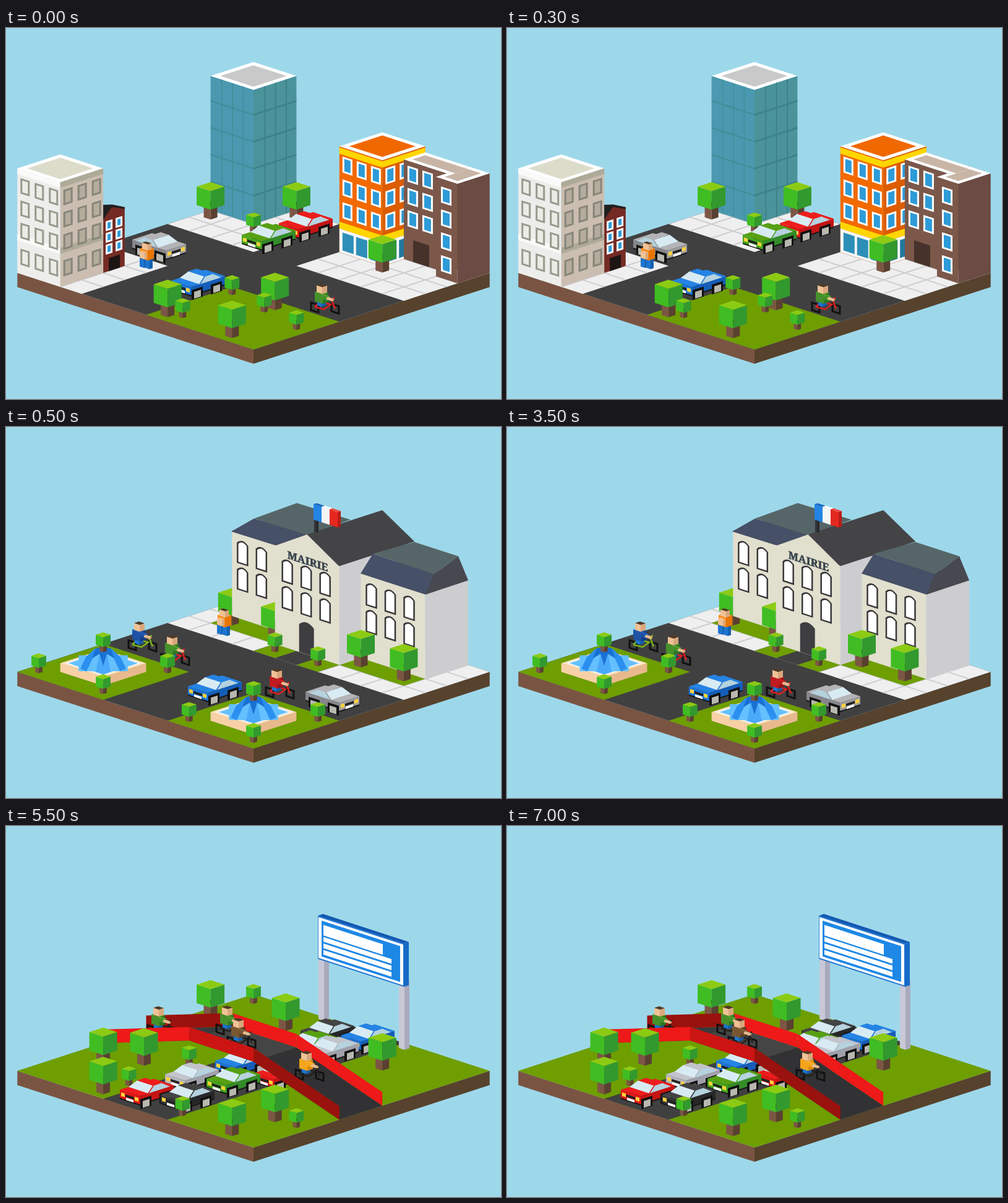
An HTML page for the animation above (8000 ms loop, 800x600 px).

```html
<!DOCTYPE html>
<html lang="fr">
<head>
<meta charset="utf-8">
<title>Isometric town</title>
<style>
html, body { margin: 0; width: 100%; height: 100%; overflow: hidden; background: #9dd8ea; }
svg { display: block; width: 800px; height: 600px; }
.scene { opacity: 0; animation: 8s step-end infinite; }
#street { animation-name: street; }
#hall { animation-name: hall; }
#bridge { animation-name: bridge; }
@keyframes street { 0% { opacity: 1 } 6.25%, 100% { opacity: 0 } }
@keyframes hall { 0% { opacity: 0 } 6.25% { opacity: 1 } 68.75%, 100% { opacity: 0 } }
@keyframes bridge { 0% { opacity: 0 } 68.75%, 100% { opacity: 1 } }
</style>
</head>
<body>
<svg viewBox="0 0 800 600">
  <g id="street" class="scene"></g>
  <g id="hall" class="scene"></g>
  <g id="bridge" class="scene"></g>
</svg>
<script>
// The town lies on 11 x 11 tiles: u runs to the lower right, v to the lower left.
const TILE = 34.7, K = 0.325, TILES = 11;
const ROAD = '#404041', GRASS = '#6e9e00', PAVE = '#efeff0', PANE = '#2d9bd8';
const TAN = ['#503a26', '#efc195', '#d9a77c'], JEANS = ['#2b86dd', '#1c75cf', '#155fae'];

const pos = (u, v, z = 0) => [400 + (u - v) * TILE, 272 + (u + v) * TILE * K - z];
const range = n => [...Array(n).keys()];
const poly = (fill, ...points) => `<polygon fill="${fill}" points="${points.join(' ')}"/>`;
const rect = (fill, x, y, w, h) => `<rect fill="${fill}" x="${x}" y="${y}" width="${w}" height="${h}"/>`;
const line = (color, width, ...points) =>
  `<polyline fill="none" stroke="${color}" stroke-width="${width}" points="${points.join(' ')}"/>`;
const at = (x, y, body, sx = 1, sy = sx) => `<g transform="translate(${x} ${y}) scale(${sx} ${sy})">${body}</g>`;
// Drawing plane of a wall: dir 1 descends to the right, -1 rises.
const wall = (x, y, dir, body) => `<g transform="matrix(1 ${dir * K} 0 1 ${x} ${y})">${body}</g>`;

// Cuboid with its front bottom corner at x, y; insets narrow the top.
function solid(x, y, w, d, h, [top, left, right], insetW = 0, insetD = insetW) {
  const pt = (u, v, z) => [x + v - u, y - (u + v) * K - z];
  const near = pt(insetW, insetD, h), west = pt(w - insetW, insetD, h), east = pt(insetW, d - insetD, h);
  return poly(left, pt(0, 0, 0), near, west, pt(w, 0, 0)) +
    poly(right, pt(0, 0, 0), near, east, pt(0, d, 0)) +
    poly(top, near, west, pt(w - insetW, d - insetD, h), east);
}

const flat = (fill, u, v, w, d, z = 0) =>
  poly(fill, pos(u, v, z), pos(u + w, v, z), pos(u + w, v + d, z), pos(u, v + d, z));

function paving(u, v, w, d) {
  const joint = (...ends) => line('#cdcdd1', 2, ...ends);
  return flat(PAVE, u, v, w, d) +
    range(w - 1).map(i => joint(pos(u + i + 1, v), pos(u + i + 1, v + d))).join('') +
    range(d - 1).map(i => joint(pos(u, v + i + 1), pos(u + w, v + i + 1))).join('');
}

const ground = top => solid(400, 543, TILES * TILE, TILES * TILE, 23, [top, '#7a5442', '#57422d']);

// Cuboid on the tile grid; `left` and `right` are drawn on its walls from their top left corner.
function building(u, v, w, d, h, paint, left = '', right = '') {
  const [x, y] = pos(u + w, v + d);
  return solid(x, y, w * TILE, d * TILE, h, paint) +
    wall(...pos(u, v + d, h), 1, left) + wall(x, y - h, -1, right);
}
const roofInset = (fill, u, v, w, d, z) => flat(fill, u + 0.23, v + 0.23, w - 0.46, d - 0.46, z);

// Evenly spaced windows.
const windows = (cols, rows, x, y, dx, dy, draw) =>
  range(rows).map(r => range(cols).map(c => draw(x + c * dx, y + r * dy)).join('')).join('');
const pane = (frame, glass, w, h) => (x, y) => rect(frame, x, y, w, h) + rect(glass, x + 3, y + 3, w - 6, h - 6);

const treeShape =
  solid(0, 0, 11, 11, 22, ['#000', '#7c5645', '#5a4030']) +
  solid(0, -16, 22.5, 22.5, 30, ['#8ccb14', '#40bd23', '#32992e']);
function plant(spots, size) {
  return spots.map(([u, v]) => {
    const [x, y] = pos(u, v);
    return at(x, y + 4 * size, treeShape, size);
  }).join('');
}
const trees = (...spots) => plant(spots, 1);
const shrubs = (...spots) => plant(spots, 0.53);

// Body paint: top, front, side.
const PAINT = {
  red: ['#ee1d1d', '#e01818', '#c51414'],
  blue: ['#2583e4', '#1c74d6', '#155db8'],
  green: ['#57a012', '#45a51c', '#348c28'],
  silver: ['#c3c3cb', '#b5b5be', '#a0a0aa'],
  gray: ['#b4b4b7', '#9b9b9f', '#87878b'],
  black: ['#434345', '#353537', '#272729']
};
const wheel = (x, y) => wall(x, y, -1, rect('#111', 0, 0, 18, 16) + rect('#b8b8b0', 4, 4, 11, 11));
function car(x, y, color, flip = false) {
  const paint = PAINT[color];
  const front = [2, 24].map(lamp => rect('#ffd23c', lamp, 3, 6, 6)).join('') +
    rect('#222', 9, 4, 14, 4) + rect('#fff', 10, 9, 12, 4);
  const body =
    solid(33, 44, 32, 55, 5, ['#111', '#161616', '#161616']) +
    solid(33, 42, 32, 55, 13, paint) + wall(1, 19, 1, front) +
    solid(47, 24.5, 32, 35, 8, [paint[0], '#d8ebf3', '#b5d2de'], 3, 11) +
    line(paint[1], 1.5, [47, 24.5], [55, 12]) +
    wheel(34, 34) + wheel(65, 25);
  return at(flip ? x + 88 : x, y, body, flip ? -1 : 1, 1);
}

const bikeWheel = (x, y) => wall(x, y, 1,
  `<rect fill="none" stroke="#111" stroke-width="3" x="0" y="0" width="12" height="12"/>`);
function rider(x, y, coat, frame) {
  return at(x, y,
    bikeWheel(3, 31) + bikeWheel(36, 33) +
    line(frame, 2.5, [9, 38], [17, 30], [35, 34], [24, 42], [9, 38]) + line(frame, 2.5, [42, 41], [36, 26], [41, 23]) +
    solid(20, 38, 7, 7, 12, JEANS) +
    solid(22, 33, 13, 9, 15, coat) + solid(30, 28, 11, 4, 6, coat) +
    solid(37, 29, 9, 3, 3, [TAN[1], TAN[1], TAN[2]]) +
    solid(21, 17, 9, 8, 11, TAN));
}
const GREEN = ['#57a52f', '#46912a', '#2e7623'], NAVY = ['#265fc0', '#1d52a5', '#173f84'];
const CRIMSON = ['#d02026', '#c11b20', '#94151a'], BROWN = ['#8a6439', '#795731', '#5c4126'];
const AMBER = ['#ffb52b', '#f5a51b', '#d98710'], ORANGE = ['#ff9a26', '#ff8a12', '#e87500'];

const walker = (x, y) => at(x, y,
  solid(11, 43, 7, 5, 16, JEANS) + solid(20, 45, 7, 5, 17, JEANS) +
  solid(17, 31, 12, 10, 16, ORANGE) + solid(12, 29, 8, 4, 10, [TAN[1], TAN[1], TAN[2]]) +
  solid(17, 15, 9, 6, 10, TAN));

function tower() {
  const side = 2 * TILE, height = 217;
  const lines = (color, width) =>
    range(3).map(i => rect(color, (i + 1) * side / 4, 0, width, height)).join('') +
    range(4).map(i => rect(color, 0, 39 + i * 43.5, side, width + 1)).join('');
  return building(0, 0, 2, 2, height, ['#fff', '#4b99b0', '#4b939b'], lines('#3f8f99', 1.5), lines('#3d828a', 2)) +
    roofInset('#c9c9c9', 0, 0, 2, 2, height);
}

function paleBlock() {
  const side = 2 * TILE;
  const front = (ledge, frame, glass) =>
    rect(ledge, 0, 0, side, 9) + rect(ledge, 0, 106, side, 10) +
    windows(3, 3, 5, 14, 23, 36, pane(frame, glass, 15, 25)) +
    windows(3, 1, 5, 128, 23, 0, pane(frame, glass, 15, 26));
  return building(0, 9, 2, 2, 169, ['#fff', '#ededeb', '#cbbeb0'],
    front('#fafaf8', '#99988c', '#ecece6'), front('#aeaa98', '#87857a', '#b4ac9c')) +
    roofInset('#dcdccb', 0, 9, 2, 2, 169);
}

function redHouse() {
  const ridge = pos(2, 8.6, 106), [x, y] = pos(2, 9, 91);
  return poly('#742b24', pos(2, 9), pos(2, 9, 93), ridge, pos(2, 8, 95), pos(2, 8)) +
    poly('#202021', pos(1.5, 9.2, 106), ridge, pos(2, 8, 95), pos(2, 8, 92), pos(2, 8.6, 102), pos(2, 9, 86)) +
    wall(x, y, -1, windows(2, 3, 4, 9, 16, 19, pane('#fff', PANE, 11, 16)) + rect('#1d1414', 9, 70, 18, 21));
}

function orangeBlock() {
  const side = 2 * TILE, height = 171;
  const front = shop =>
    rect('#ffd600', 0, 2, side, 10) + rect('#ffd600', 0, 122, side, 11) +
    windows(3, 3, 5, 15, 23, 37, pane('#fff', PANE, 16, 26)) +
    rect('#f7f7f7', 0, 133, side, 38) + windows(3, 1, 5, 138, 22, 0, (x, y) => rect(shop, x, y, 18, 29));
  return building(6, 0, 2, 2, height, ['#fff', '#f26900', '#dd5c00'], front('#2d8fb8'), front('#24789c')) +
    roofInset('#f06800', 6, 0, 2, 2, height);
}

function brownBlock() {
  const paint = ['#fff', '#7b584a', '#6b4b43'], glass = pane('#fff', PANE, 17, 26), height = 161;
  return building(8, 0, 2, 1, height, paint, windows(2, 3, 6, 8, 24, 36, glass) + rect('#47322b', 15, 126, 26, 35)) +
    building(10, 0, 1, 1.5, height, paint, windows(1, 4, 8, 13, 0, 37, glass)) +
    flat('#c8b5a6', 8.2, 0.2, 2, 0.6, height) + flat('#c8b5a6', 10.2, 0.2, 0.6, 1.1, height);
}

function street() {
  return ground(ROAD) + flat(GRASS, 6, 7, 5, 4) +
    paving(0, 0, 4, 4) + paving(6, 0, 5, 4) + paving(0, 7, 3, 4) +
    tower() + redHouse() + paleBlock() + orangeBlock() + brownBlock() +
    trees([0.5, 2.5], [2.5, 0.5], [8.3, 2.3]) +
    car(440, 297, 'red') + shrubs([2.5, 2.5]) + car(380, 316, 'green') +
    car(204, 331, 'gray', true) + walker(212, 345) + car(266, 390, 'blue') +
    trees([6.5, 10.5], [8.5, 7.5]) + shrubs([6.5, 7.5], [7, 10.3], [8.5, 8]) +
    trees([9.5, 10.5]) + shrubs([10.5, 8.5]) + rider(490, 413, GREEN, '#dd2020');
}

function fountain(u, v) {
  const [x, y] = pos(u, v, 14);
  const star = (fill, outer, inner) => poly(fill, ...range(16).map(i => {
    const angle = i * Math.PI / 8, r = i % 2 ? inner : outer;
    return [r * Math.cos(angle), r * Math.sin(angle) * K];
  }));
  const jet = side => at(0, 0,
    poly('#2b8ff0', [0, -27], [14, -23], [28, -10], [37, 9], [27, 13], [17, -8], [8, -16], [0, -18]) +
    poly('#1a70d2', [0, -27], [12, -24], [18, -8], [6, -15], [0, 5]) +
    poly('#4ba9fa', [0, 5], [6, -15], [12, 14], [0, 18]), side, 1);
  return solid(x, y + 14 + 2 * TILE * K, 2 * TILE, 2 * TILE, 14, ['#ffe3c4', '#f8d0a6', '#e8b98d']) +
    at(x, y, poly('#f3f9ff', [-61, 0], [0, -19.5], [61, 0], [0, 19.5]) + star('#64c0ff', 56, 43) + jet(-1) + jet(1));
}

// Lawn with a fountain and a shrub in each corner.
function park(u, v) {
  return flat(GRASS, u, v, 4, 4) + shrubs([u + 0.5, v + 0.5], [u + 0.5, v + 3.5]) +
    fountain(u + 2, v + 2) + shrubs([u + 0.5, v + 0.5], [u + 3.5, v + 0.5], [u + 3.5, v + 3.5]);
}

const archWindow = (x, y) =>
  `<path d="M${x} ${y + 36}v-31q8 -9 16 0v31z" fill="#fff" stroke="#38383a" stroke-width="2.5"/>`;

function townHall() {
  const paint = ['#464650', '#e1dfcd', '#cdcdd0'], slate = '#465067', slateTop = '#566668', dark = '#444447';
  const arches = (cols, x, y) => windows(cols, 2, x, y, 30.5, 43, archWindow);
  const gable = pos(5.5, 3, 194), ridge = pos(5.5, -0.5, 194);
  const title = '<text x="20" y="15" font-family="Noto Serif, Liberation Serif, serif" font-weight="900" ' +
    'font-size="17" fill="#38444c" stroke="#38444c" stroke-width=".6">MAIRIE</text>';
  const door = '<path d="M39 160v-45q12 -13 24 0v45z" fill="#3e3e41"/>';
  return building(1, -1, 3, 3, 138, paint, arches(2, 9, 12)) +
    poly(slate, [364, 169], [401, 148], [487, 175], [434, 191]) +
    poly(slateTop, [401, 148], [470, 123], [557, 150], [487, 175]) + trees([3.5, 2.5]) +
    building(4, 0, 3, 3, 160, paint, arches(3, 12, 18)) +
    poly(paint[1], pos(4, 3, 159), gable, pos(7, 3, 159)) +
    poly(dark, gable, ridge, pos(7, -0.5, 160), pos(7, 3, 160)) +
    wall(...pos(4, 3, 160), 1, title + door) +
    building(7, 0, 3, 2, 137, paint, arches(3, 9, 12)) +
    poly(slate, [573, 237], [593, 205], [692, 238], [678, 271]) +
    poly(slateTop, [593, 205], [660, 186], [731, 209], [692, 238]) +
    poly('#484850', [692, 238], [731, 209], [747, 248], [678, 271]);
}

const flag = () =>
  solid(502, 171, 4, 3, 26, ['#303338', '#303338', '#26282c']) +
  [['#1565bd', '#2384e4'], ['#fff', '#f5f5f5'], ['#f04a40', '#e4281f']].map(([top, face], i) =>
    solid(510 + i * 13, 154 + i * 4.2, 13, 5, 25, [top, face, '#b91c18'])).join('');

function hall() {
  return ground(ROAD) + paving(0, 0, 11, 4) +
    flat(ROAD, 4, 3, 3, 1) + flat(GRASS, 1, 2, 3, 1) + flat(GRASS, 4, 3, 1, 1) +
    flat(GRASS, 6, 3, 1, 1) + flat(GRASS, 7, 2, 3, 1) +
    trees([1.5, 2.5]) + townHall() + flag() + trees([7.5, 2.5], [9.5, 2.5]) +
    shrubs([4.5, 3.5], [6.5, 3.5]) + walker(337, 293) + park(0, 7) +
    rider(195, 314, NAVY, '#79b51c') + rider(248, 336, GREEN, '#dd2020') + shrubs([3.5, 7.5]) +
    rider(417, 390, CRIMSON, '#dd2020') + car(293, 401, 'blue') + car(484, 417, 'gray', true) + park(7, 7);
}

function billboard() {
  const post = (x, y, h) => solid(x, y, 9, 8, h, ['#c8c8d7', '#c8c8d7', '#aaaabd']);
  return post(514, 315, 105) + post(644, 362, 110) +
    solid(643, 260, 4 * TILE, 8, 70, ['#1258b3', '#1d72d0', '#166ac7']) +
    wall(504, 145, 1,
      rect('#fff', 1, 2, 137, 66) + rect('#1e88e5', 6, 6, 127, 58) + rect('#fff', 9, 12, 96, 17) +
      range(3).map(i => rect('#fff', 9, 31.5 + i * 10.5, 110, 7.5)).join(''));
}

function bridge() {
  const light = '#ee1919', middle = '#cc1512', deep = '#9a120d', near = 7, far = 5;
  const deck = [[0, 0], [4, 49], [7, 49], [11, 0]];
  const spans = (colors, shape) => colors.map((color, i) => poly(color, ...shape(deck[i], deck[i + 1]))).join('');
  const barrier = (v, colors) => spans(colors, ([u0, z0], [u1, z1]) =>
    [pos(u0, v, z0), pos(u1, v, z1), pos(u1, v, z1 + 22), pos(u0, v, z0 + 22)]);
  const surface = spans(['#3a3a3c', '#454546', '#323234'], ([u0, z0], [u1, z1]) =>
    [pos(u0, far, z0), pos(u1, far, z1), pos(u1, near, z1), pos(u0, near, z0)]);
  return ground(GRASS) + flat(ROAD, 4, 0, 3, 11) +
    trees([0.5, 2.5]) + shrubs([0.6, 0.6]) + billboard() + trees([3.2, 1.7]) +
    car(475, 312, 'black') + car(450, 331, 'green') + car(540, 320, 'blue') + car(482, 340, 'silver') +
    car(337, 361, 'blue') + car(400, 381, 'red') +
    barrier(far, [deep, light, light]) + surface +
    rider(226, 291, GREEN, '#222') + rider(337, 290, GREEN, '#222') +
    rider(355, 310, BROWN, '#222') + rider(465, 363, AMBER, '#222') +
    barrier(near, [light, middle, deep]) +
    trees([8.3, 2.3], [1.4, 8.4], [2.4, 7.5]) + shrubs([3.5, 6.5], [3.6, 9.4]) + trees([3.5, 10.5]) +
    car(256, 383, 'silver') + car(323, 390, 'green') + car(183, 408, 'red') + car(249, 416, 'black') +
    shrubs([7, 10.3]) + trees([9.5, 8.5], [9.5, 10.5]) + shrubs([10.5, 8.5]);
}

for (const draw of [street, hall, bridge]) document.getElementById(draw.name).innerHTML = draw();
</script>
</body>
</html>
```
